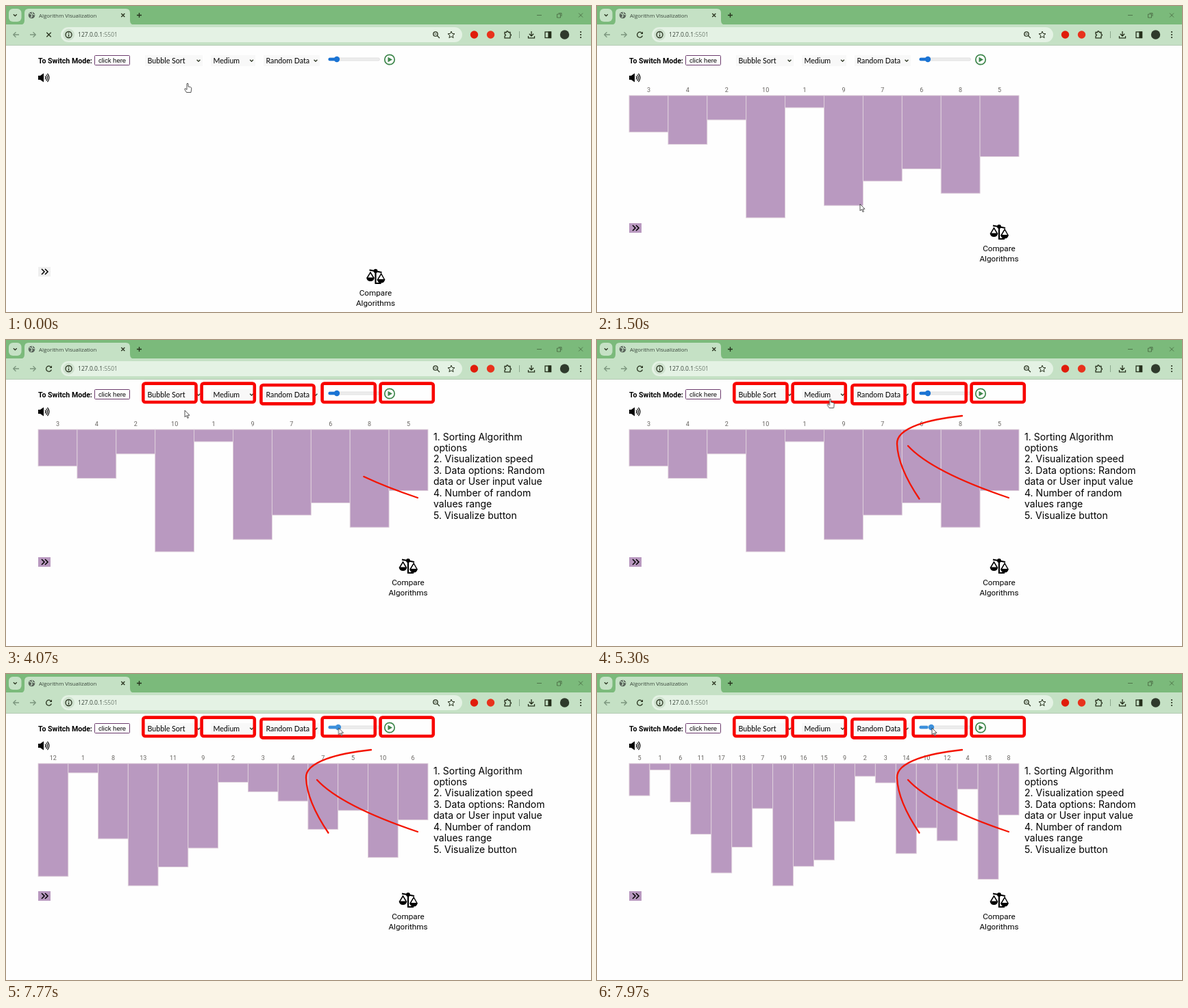
These frames come from a looping animation (854 px wide and 448 px high, 8 s). An HTML page:

```html
<!DOCTYPE html>
<html lang="en">
<head>
<meta charset="utf-8">
<title>Algorithm Visualization</title>
<style>
html, body { margin: 0; width: 100%; height: 100%; overflow: hidden; background: #fefefe; }
svg { display: block; width: 100%; height: 100%; }
text { white-space: pre; }
.line { fill: none; stroke: #26301c; stroke-width: 1.3; }
.dim { stroke: #7c977e; }
.ui { font: 8.55px "Open Sans", "Noto Sans", sans-serif; fill: #38453a; }
.lato { font: 10.67px Lato, sans-serif; }
.roboto { font: 11.7px Roboto, sans-serif; text-anchor: middle; }
.value { font: 9px Roboto, sans-serif; text-anchor: middle; fill: #66635f; }
.note { font: 14.05px Inter, sans-serif; }
.bar { fill: #b999c0; stroke: #e0d2dc; stroke-width: .9; }
.mark { fill: none; stroke: #f80400; }

/* hard switches */
.show { opacity: 0; animation: 8s step-end infinite; }
.before { animation-name: before; }
.after { animation-name: after; }
.loader { animation-name: loader; }
.stop { animation-name: stop; }
.reload { animation-name: reload; }
.hand { animation-name: hand; }
.arrow { animation-name: arrow; }
.n10 { animation-name: n10; }
.n13 { animation-name: n13; }
.n15 { animation-name: n15; }
.n17 { animation-name: n17; }
.n19 { animation-name: n19; }
@keyframes before { 0% { opacity: 1 } .375% { opacity: 0 } }
@keyframes loader { .375% { opacity: 1 } 13.375% { opacity: 0 } }
@keyframes after { 18.75% { opacity: 1 } 100% { opacity: 1 } }
@keyframes stop { 0% { opacity: 1 } 2.5% { opacity: 0 } }
@keyframes reload { 2.5% { opacity: 1 } 100% { opacity: 1 } }
@keyframes hand { 0% { opacity: 1 } 4% { opacity: 0 } 66.25% { opacity: 1 } 89% { opacity: 0 } }
@keyframes arrow { 4% { opacity: 1 } 66.25% { opacity: 0 } 89% { opacity: 1 } 100% { opacity: 1 } }
@keyframes n10 { 18.75% { opacity: 1 } 97.125% { opacity: 0 } }
@keyframes n13 { 97.125% { opacity: 1 } 97.875% { opacity: 0 } }
@keyframes n15 { 97.875% { opacity: 1 } 98.75% { opacity: 0 } }
@keyframes n17 { 98.75% { opacity: 1 } 99.625% { opacity: 0 } }
@keyframes n19 { 99.625% { opacity: 1 } 100% { opacity: 1 } }

.ring { fill: none; stroke-width: 1.7; stroke-dasharray: 1 1; stroke-dashoffset: -.5;
  animation: spin 8s linear 56ms infinite; }
@keyframes spin { from { rotate: 0deg } to { rotate: var(--turn) } }

.notes { animation: notes 8s linear infinite; }
@keyframes notes { 0%, 45% { opacity: 0 } 47.5%, 100% { opacity: 1 } }

.stroke { stroke: #f41400; stroke-width: 2.3; stroke-linecap: round; stroke-dasharray: 1 2;
  animation: 8s linear infinite; }
.shaft { animation-name: shaft; }
.head { animation-name: head; }
@keyframes shaft { 0%, 46.66% { stroke-dashoffset: 1.01 } 54.94%, 100% { stroke-dashoffset: 0 } }
@keyframes head { 0%, 54.94% { stroke-dashoffset: 1.01 } 65.375%, 100% { stroke-dashoffset: 0 } }

.thumb { fill: #1b74d4; animation: thumb 8s step-end infinite; }
.filled { animation: filled 8s step-end infinite; }
@keyframes thumb {
  0% { translate: 0 }
  97.125% { translate: 2px; fill: #3d90dc }
  97.875% { translate: 3px; fill: #3d90dc }
  98.75% { translate: 4px; fill: #3d90dc }
  99.625%, 100% { translate: 5px; fill: #3d90dc }
}
@keyframes filled { 97.125%, 100% { fill: #3d90dc } }

.cursor { animation: cursor 8s linear infinite; }
.cursor path { fill: #fefefe; stroke: #2c2c2c; stroke-width: .8; stroke-linejoin: round; }
@keyframes cursor {
  0%, .375% { translate: 265px 113px }
  9.625% { translate: 275px 126px }
  10.875% { translate: 324px 166px }
  13.375%, 25.37% { translate: 384px 290px }
  25.375%, 31.62% { translate: 376px 278px }
  31.625% { translate: 369px 261px }
  32.5%, 36.625% { translate: 250px 181px }
  38.75%, 55.375% { translate: 261px 103px }
  65.375% { translate: 288px 86px }
  66.25%, 71.625% { translate: 340.5px 86px }
  72.125%, 77.875% { translate: 350px 86px }
  78.75%, 81.24% { translate: 364px 86px }
  81.25%, 84.625% { translate: 360px 88px }
  85%, 87.125% { translate: 359px 85px }
  91.25% { translate: 368px 111px }
  94.625%, 97.12% { translate: 371px 108px }
  97.125% { translate: 485.5px 79px }
  99.625%, 100% { translate: 489px 79px }
}
</style>
</head>
<body>
<svg viewBox="0 0 854 448" preserveAspectRatio="none">
  <defs>
    <path id="caret" d="M-2.4-1.2 0 1.2 2.4-1.2"/>
    <g id="expand">
      <rect width="18" height="14"/>
      <path d="M5 3 9 7 5 11M10 3 14 7 10 11" fill="none" stroke="#000" stroke-width="1.5"/>
    </g>
    <g id="compare">
      <g fill="none" stroke="#000" stroke-width="2.2">
        <path d="M-9-9.500 9-6M0-7V9.500M-1 10H8"/>
        <path d="M-12.300 2-7.500-6-2.700 2M3.200 4.500 8.200-4 13 4.500" stroke-width="1.500"/>
      </g>
      <circle cy="-8" r="3"/>
      <path d="M-13.500 1.500H-1.500Q-2.500 7-7.500 7T-13.500 1.500ZM2 4H14Q13 9.500 8 9.500T2 4Z"/>
      <text class="roboto" y="28">Compare</text>
      <text class="roboto" y="42.700">Algorithms</text>
    </g>
  </defs>

  <rect width="854" height="448" fill="#fefefe"/>

  <!-- browser window -->
  <rect width="854" height="28" fill="#7bba7b"/>
  <path d="M20 28Q27 28 27 21V10Q27 4 33 4H175Q181 4 181 10V21Q181 28 188 28Z" fill="#c5e1c5"/>
  <rect y="27" width="854" height="30.5" fill="#c5e1c5"/>
  <rect y="57" width="854" height="1" fill="#b4cbb4"/>
  <rect x="4" y="4" width="18.500" height="19" rx="6" fill="#c5e1c5"/>
  <rect x="80" y="31" width="586" height="22" rx="11" fill="#e4f2e4"/>
  <circle cx="91.500" cy="42" r="8.5" fill="#cfe2cf"/>
  <use href="#caret" class="line" x="13.300" y="13.500"/>
  <circle cx="37.500" cy="13.500" r="4.800" fill="#58635a"/>
  <path d="M34 11 37 12 38 15 36 17M38 9 39 12 42 13" fill="none" stroke="#c5e1c5" stroke-width="1.300"/>
  <text class="ui" x="48" y="16.500" style="font-size:7.9px">Algorithm Visualization</text>
  <g class="line">
    <path d="M168.300 11 173.300 16M173.300 11 168.300 16M191 13.500H198M194.500 10V17"/>
    <path d="M775 13.500H782M804.500 12H809.500V17H804.500ZM806.500 10.500H811V15M836 10.500 842 16.500M842 10.500 836 16.500" stroke-width=".7" opacity=".7"/>
    <path class="dim" d="M19 42H11M14.500 38.200 10.700 42 14.500 45.800M35 42H43M39.500 38.200 43.300 42 39.500 45.800"/>
    <path class="show stop" d="M59.300 38.800 65.700 45.200M65.700 38.800 59.300 45.200"/>
    <g class="show reload">
      <path d="M66 40A4 4 0 1 0 66.400 43.500"/>
      <path d="M67 37.500V41H63.500Z" fill="#26301c" stroke="none"/>
    </g>
    <circle cx="91.500" cy="42" r="4.500"/>
    <path d="M91.500 41.500V44.700M91.500 39V40.300"/>
    <circle cx="627" cy="41" r="3.200"/>
    <path d="M629.500 43.500 633 47M625.500 41H628.500" stroke-width="1.100"/>
    <path d="M650 37 651.400 40.400 655 40.700 652.200 43 653.100 46.600 650 44.700 646.900 46.600 647.800 43 645 40.700 648.600 40.400Z" stroke-width="1"/>
    <path d="M728 38.500H730.500Q731.500 35 733.500 38.500H736V41.200Q739 42.500 736 44V46.800H728V44Q731 42.500 728 41.200Z"/>
    <path class="dim" d="M749.500 37V47" stroke-width=".8"/>
    <path d="M767 37V43.500M763.800 40.800 767 44 770.200 40.800M762.500 44V46.800H771.500V44"/>
    <rect x="787" y="38" width="8.500" height="8.500"/>
    <rect x="792" y="38" width="3.500" height="8.500" fill="#26301c"/>
  </g>
  <text class="ui" x="105" y="45.300">127.0.0.1<tspan fill="#6f7d70">:5501</tspan></text>
  <circle cx="683.500" cy="42" r="5.700" fill="#e01c0a"/>
  <circle cx="707.500" cy="42" r="5.700" fill="#e8321c"/>
  <circle cx="815.500" cy="42" r="6.700" fill="#2f3a2c"/>
  <g fill="#26301c">
    <circle cx="839" cy="38" r="1.100"/><circle cx="839" cy="42" r="1.100"/><circle cx="839" cy="46" r="1.100"/>
  </g>

  <!-- controls -->
  <text x="47" y="83.500" style="font:bold 10.600px Roboto,sans-serif">To Switch Mode:</text>
  <rect x="129.500" y="72.500" width="51" height="14" rx="1" fill="#fefefe" stroke="#6b3a6c"/>
  <text x="135" y="82.800" style="font:9.500px 'Liberation Sans',Arial,sans-serif">click here</text>
  <g fill="#f8f8f8">
    <rect x="203" y="72" width="84" height="16"/>
    <rect x="299" y="72" width="65" height="16"/>
    <rect x="376" y="72" width="82" height="16"/>
  </g>
  <g class="lato">
    <text x="206.500" y="84">Bubble Sort</text>
    <text x="302.500" y="84">Medium</text>
    <text x="379.500" y="84">Random Data</text>
  </g>
  <g class="line">
    <use href="#caret" x="281" y="80"/><use href="#caret" x="358.500" y="80"/><use href="#caret" x="452" y="80"/>
  </g>
  <rect x="471" y="76" width="74.500" height="4" rx="2" fill="#ededed" stroke="#d6d3d6" stroke-width=".6"/>
  <rect class="filled" x="470.500" y="75.800" width="13" height="4.400" rx="2" fill="#1b74d4"/>
  <circle class="thumb" cx="483" cy="78" r="4.200"/>
  <circle cx="560" cy="78.500" r="7.200" fill="none" stroke="#3f874c" stroke-width="1.700"/>
  <path d="M557.500 74.700 564 78.500 557.500 82.300Z" fill="#3f874c"/>
  <path d="M47 102H50L55 98.500V111.500L50 108H47Z"/>
  <path d="M57 102.500Q59 105 57 107.500M58.800 100.500Q62 105 58.800 109.500M60.500 98.800Q65.300 105 60.500 111.200" fill="none" stroke="#000" stroke-width="1.200"/>

  <g class="show before">
    <use href="#expand" x="47" y="382" fill="#efefef"/>
    <use href="#compare" x="539.500" y="396"/>
  </g>

  <g class="show loader">
    <g transform="translate(428.700 254.500)">
      <circle class="ring" pathLength="4" r="45.800" stroke="#5c605c" style="--turn:1440deg"/>
      <circle class="ring" pathLength="4" r="41.800" stroke="#d9d836" style="--turn:2400deg"/>
      <circle class="ring" pathLength="4" r="36.600" stroke="#74443f" style="--turn:3360deg"/>
    </g>
    <text x="403" y="259.500" fill="#9e9c70" style="font:bold 10.670px 'Liberation Sans',Arial,sans-serif">LOADING..</text>
  </g>

  <g id="charts"></g>
  <g class="show after">
    <use href="#expand" x="47" y="318" fill="#b999c0"/>
    <use href="#compare" x="587" y="331"/>
  </g>

  <g class="notes">
    <g id="frames" class="mark" stroke-width="4.600"></g>
    <g id="legend" class="note"></g>
  </g>
  <path class="mark stroke shaft" pathLength="1" d="M601 231Q489 193 454 155"/>
  <path class="mark stroke head" pathLength="1" d="M533 111C486 116 437 128 438 152C439 180 454 208 470.500 232.500"/>

  <g class="cursor">
    <path class="show arrow" d="M0 0V9.800L2.300 7.700 4 11.500 5.500 10.800 3.900 7.200H7Z"/>
    <path class="show hand" d="M-1 .8Q0-.6 1 .8V5L4.500 5.800Q6 6.300 5.800 8L5 13.500H-1.500L-4 9.500Q-4.500 7.500-3 7.800L-1 9.500Z"/>
  </g>
</svg>
<script>
const $ = id => document.getElementById(id);

function add(parent, tag, attrs, content = '') {
  const node = document.createElementNS('http://www.w3.org/2000/svg', tag);
  for (const [key, value] of Object.entries(attrs)) node.setAttribute(key, value);
  node.textContent = content;
  return parent.appendChild(node);
}

const sequence = (n, step, start) => Array.from({ length: n }, (_, i) => (i * step + start) % n + 1);

function chart(values) {
  const n = values.length, width = 569 / n;
  const group = add($('charts'), 'g', { class: `show n${n}` });
  values.forEach((value, i) => {
    const x = 47 + i * width;
    add(group, 'rect', { class: 'bar', x, y: 131, width, height: value / n * 179 });
    add(group, 'text', { class: 'value', x: x + width / 2, y: 126 }, value);
  });
}

[
  [3, 4, 2, 10, 1, 9, 7, 6, 8, 5],
  [12, 1, 8, 13, 11, 9, 2, 3, 4, 7, 5, 10, 6],
  sequence(15, 7, 4),
  sequence(17, 5, 8),
  [5, 1, 6, 11, 17, 13, 7, 19, 16, 15, 9, 2, 3, 14, 10, 12, 4, 18, 8],
].forEach(chart);

[[200.3, 63.6], [285.6, 63.6], [372.4, 66], [461.6, 63.6], [546.6, 63.6]].forEach(([x, y]) =>
  add($('frames'), 'rect', { x, y, width: 77.2, height: 27.4, rx: 3 }));

[
  '1. Sorting Algorithm', 'options', '2. Visualization speed', '3. Data options: Random',
  'data or User input value', '4. Number of random', 'values range', '5. Visualize button',
].forEach((line, i) => add($('legend'), 'text', { x: 624, y: 146.5 + i * 16.45 }, line));
</script>
</body>
</html>
```
